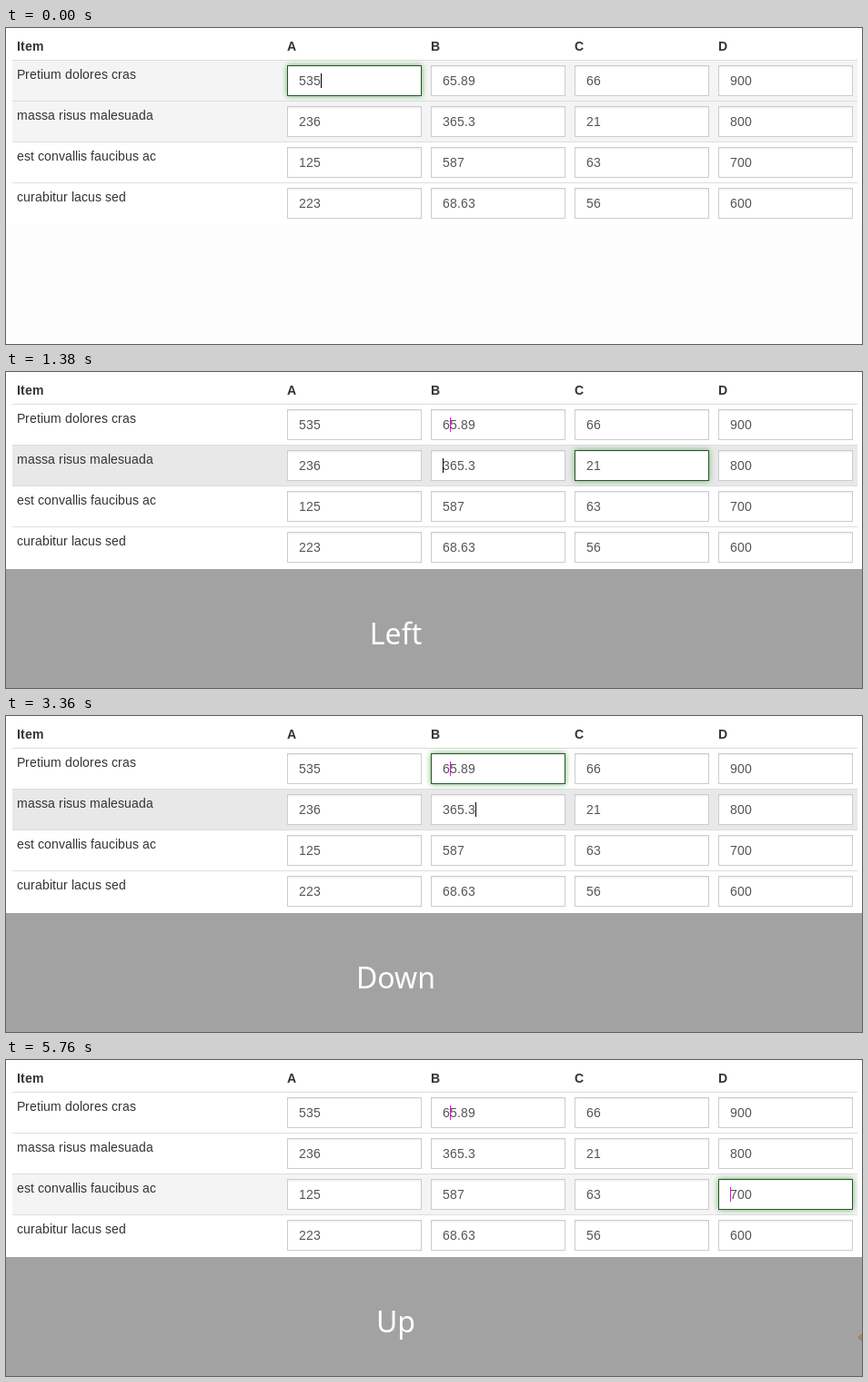
An HTML page with a canvas that plays this animation: 941x348 px, repeating every 6.18 s.

```html
<!DOCTYPE html>
<html lang="en">
<head>
<meta charset="utf-8">
<title>Table arrow-key navigation</title>
<style>
  html, body { margin: 0; width: 100%; height: 100%; overflow: hidden; background: #fff; }
  canvas { display: block; width: 941px; height: 348px; }
</style>
</head>
<body>
<canvas id="stage" width="941" height="348"></canvas>
<script>
const ctx = document.getElementById('stage').getContext('2d');
const LOOP = 6180, STEP = 60, FADE = 150;
const HOVER_ROW = 1, HOVER_END = 5700;

const heads = ['A', 'B', 'C', 'D'];
const rows = [
  ['Pretium dolores cras', '535', '65.89', '66', '900'],
  ['massa risus malesuada', '236', '365.3', '21', '800'],
  ['est convallis faucibus ac', '125', '587', '63', '700'],
  ['curabitur lacus sed', '223', '68.63', '56', '600']
];

// time, column, row, key, caret index
const moves = [
  [-1000, 0, 0, '', 3],
  [20, 1, 0, 'Right', 1],
  [410, 2, 0, 'Right', 1],
  [770, 2, 1, 'Down', 2],
  [1370, 1, 1, 'Left', 0],
  [1790, 1, 2, 'Down', 3],
  [2090, 1, 3, 'Down', 5],
  [2430, 1, 2, 'Up', 0],
  [2920, 1, 1, 'Up', 0],
  [3030, 1, 0, 'Up', 0],
  [3350, 1, 1, 'Down', 5],
  [3820, 1, 2, 'Down', 3],
  [3930, 1, 3, 'Down', 5],
  [4370, 2, 3, 'Right', 1],
  [4520, 3, 3, 'Right', 3],
  [5030, 3, 2, 'Up', 0]
].map(([at, col, row, key, caret]) => ({ at, col, row, key, caret }));

const cellX = col => 309 + 158 * col;
const rowY = row => 35 + 45 * row;

function fill(color, x, y, w, h) {
  ctx.fillStyle = color;
  ctx.fillRect(x, y, w, h);
}

// Whole-pixel advances, as in hinted text
const advance = ch => Math.round(ctx.measureText(ch).width);

function text(str, x, y, color, weight = '') {
  ctx.font = weight + ' 14px "Liberation Sans", Arial, sans-serif';
  ctx.textAlign = 'left';
  ctx.fillStyle = color;
  for (const ch of str) {
    ctx.fillText(ch, x, y);
    x += advance(ch);
  }
  return x;
}

function fade(t, at) {
  const p = Math.min(1, Math.max(0, (t - at) / FADE));
  return p * p * (3 - 2 * p);
}

function glowOf(t, col, row) {
  let glow = 0;
  moves.forEach((m, i) => {
    if (m.col !== col || m.row !== row) return;
    const next = moves[i + 1];
    glow = Math.max(glow, fade(t, m.at) * (next ? 1 - fade(t, next.at) : 1));
  });
  return glow;
}

function frameRect(color, x, y) {
  ctx.strokeStyle = color;
  ctx.lineWidth = 1;
  ctx.strokeRect(x + 0.5, y + 0.5, 147, 33);
}

function drawInput(col, row, t) {
  const x = cellX(col), y = rowY(row) + 6, glow = glowOf(t, col, row);
  if (glow > 0) {
    ctx.save();
    ctx.globalAlpha = glow;
    ctx.shadowColor = '#67b168';
    ctx.shadowBlur = 6;
    fill('#fff', x, y, 148, 34);
    ctx.restore();
  }
  fill('#fff', x, y, 148, 34);
  fill('rgba(0,0,0,.06)', x + 1, y + 1, 146, 1);
  fill('rgba(0,0,0,.02)', x + 1, y + 2, 146, 1);
  frameRect(col + row === 0 ? '#c8d2c8' : '#ccc', x, y);
  if (glow > 0) {
    ctx.globalAlpha = glow;
    frameRect('#2b542c', x, y);
    ctx.globalAlpha = 1;
  }
  text(rows[row][col + 1], x + 13, y + 22, '#555');
}

function drawCaret(col, row, index, color) {
  ctx.font = '14px "Liberation Sans", Arial, sans-serif';
  let x = cellX(col) + 13;
  for (const ch of rows[row][col + 1].slice(0, index)) x += advance(ch);
  fill(color, x, rowY(row) + 15, 1, 16);
}

function drawPanel(key) {
  fill('#a2a2a2', 0, 217, 941, 131);
  ctx.font = '32px "Noto Sans", sans-serif';
  ctx.textAlign = 'center';
  ctx.fillStyle = '#fff';
  ctx.fillText(key, 428.5, 299.5);
}

function draw(t) {
  const now = moves.filter(m => m.at <= t).pop();
  fill('#fff', 0, 0, 941, 348);
  fill('#fdfdfd', 0, 216, 941, 132);

  text('Item', 12, 25, '#333', 'bold');
  heads.forEach((h, i) => text(h, cellX(i), 25, '#333', 'bold'));

  rows.forEach((cells, r) => {
    const y = rowY(r);
    const tint = (r === now.row) + (r === HOVER_ROW && t < HOVER_END);
    if (tint) fill(tint > 1 ? '#e8e8e8' : '#f4f4f4', 7, y, 929, 45);
    fill('#ddd', 7, y, 929, 1);
    text(cells[0], 12, y + 21, '#333');
  });
  rows.forEach((_, r) => heads.forEach((_, c) => drawInput(c, r, t)));

  if (t >= 480) drawCaret(1, 0, 1, '#f0f');
  const overGhost = t >= 480 && now.col === 1 && now.row === 0;
  if (!overGhost) drawCaret(now.col, now.row, now.caret, t >= HOVER_END ? '#f0f' : '#000');

  if (now.key) drawPanel(now.key);

  // Pointer tip at the right edge
  if (t >= 5760) {
    ctx.fillStyle = '#a08468';
    ctx.beginPath();
    ctx.moveTo(936, 305.5);
    ctx.lineTo(941, 301);
    ctx.lineTo(941, 310);
    ctx.fill();
  }
}

function tick() {
  const t = performance.now() % LOOP;
  draw(Math.floor(t / STEP) * STEP);
  requestAnimationFrame(tick);
}
tick();
</script>
</body>
</html>
```
